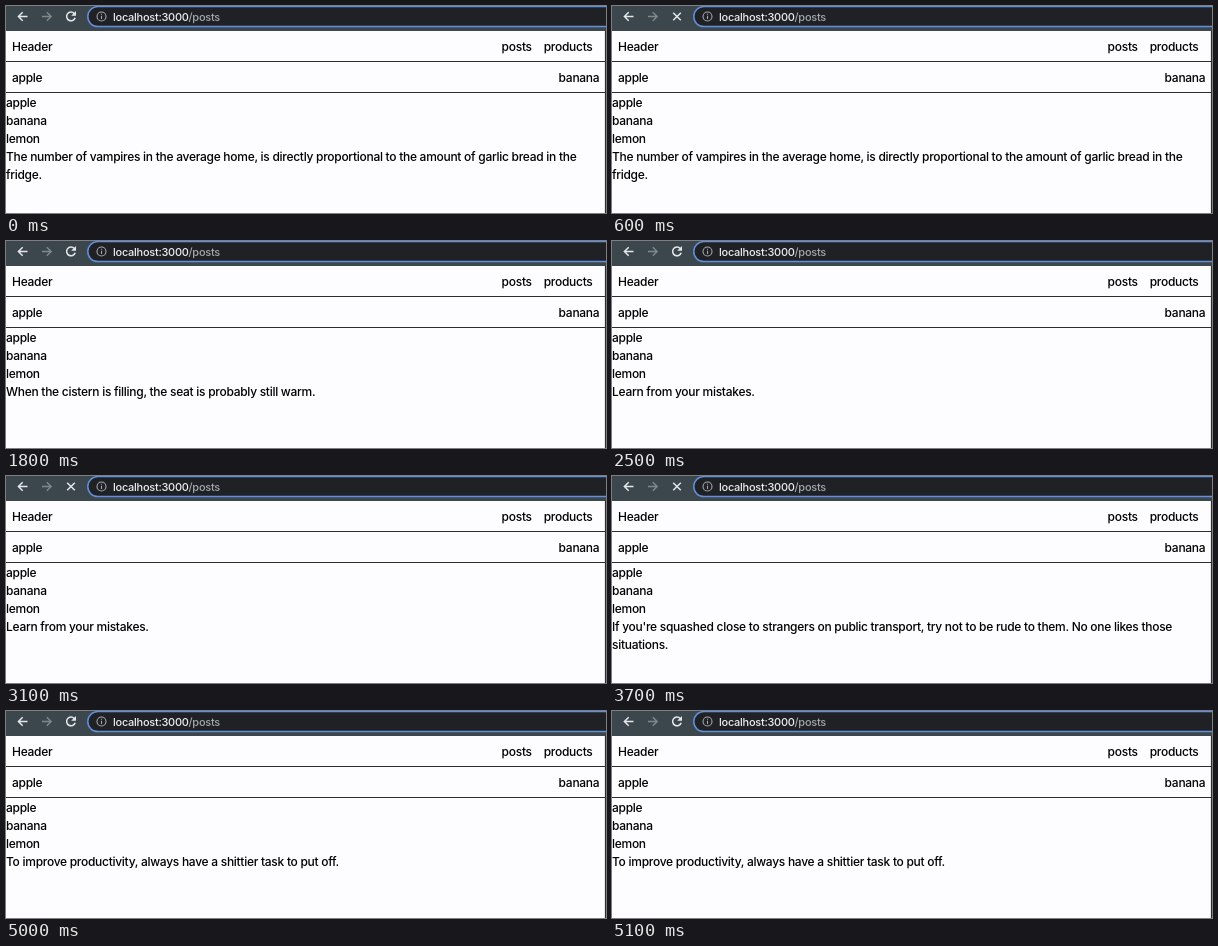
These frames come from a looping animation (600x207 px, 5.6 s). An HTML page:

```html
<!DOCTYPE html>
<html lang="en">
<head>
<meta charset="utf-8">
<style>
  html, body { margin: 0; width: 100%; height: 100%; overflow: hidden; background: #fdfcfe; }
  svg { display: block; }
  text { font: 500 12px Inter, sans-serif; letter-spacing: -.28px; fill: #000; white-space: pre; }
  .url { font-size: 11px; letter-spacing: -.27px; fill: #eceef0; }
  .icon { fill: none; stroke: #e3e7e9; stroke-width: 1.5; }
  .rule { fill: none; stroke: #2c2c2e; stroke-width: 1.2; }
</style>
</head>
<body>
<svg width="600" height="207" viewBox="0 0 600 207">
  <rect width="600" height="207" fill="#fdfcfe"/>
  <rect width="600" height="25" fill="#3c474d"/>
  <rect x="81.8" y=".6" width="540" height="20" rx="10" fill="#1f2124" stroke="#6390dc" stroke-width="1.5"/>

  <path class="icon" d="M21.5 10.5H12.5M16.7 6.2L12.4 10.5L16.7 14.8"/>
  <path class="icon" style="stroke:#7f888d" d="M36 10.5H45M40.8 6.2L45.1 10.5L40.8 14.8"/>
  <g id="reload">
    <path class="icon" d="M68.3 7.4A4.4 4.4 0 1 0 69.2 11.8"/>
    <path fill="#e3e7e9" d="M70 5V9.8H65.2Z"/>
  </g>
  <path id="stop" class="icon" d="M61.2 6.7L68.8 14.3M68.8 6.7L61.2 14.3"/>

  <g class="icon" style="stroke:#a3a8ad;stroke-width:1.1">
    <circle cx="95.5" cy="10.5" r="4.5"/>
    <path d="M95.5 9.8V13M95.5 7.7V8.8"/>
  </g>
  <text class="url" x="107" y="14.6">localhost:3000<tspan fill="#a4a9ae">/posts</tspan></text>

  <path class="rule" d="M0 55.5H600M0 86.5H600M599.5 25V207"/>
  <text x="6" y="45">Header</text>
  <text x="495.6" y="45">posts</text>
  <text x="537.7" y="45">products</text>
  <text x="6" y="76">apple</text>
  <text x="552.6" y="76">banana</text>
  <text x="0" y="101">apple</text>
  <text x="0" y="119">banana</text>
  <text x="0" y="137">lemon</text>
  <text id="line1" x="0" y="155"></text>
  <text id="line2" x="0" y="173"></text>
</svg>
<script>
  const LOOP = 5600;
  // start: advice appears; reload: the next page load begins
  const pages = [
    { start: 0, reload: 600, lines: ["The number of vampires in the average home, is directly proportional to the amount of garlic bread in the", "fridge."] },
    { start: 1000, reload: 1300, lines: ["If you find yourself distressed about something, ask yourself if it will still matter tomorrow or next week or", "next month."] },
    { start: 1800, reload: 2100, lines: ["When the cistern is filling, the seat is probably still warm."] },
    { start: 2500, reload: 2800, lines: ["Learn from your mistakes."] },
    { start: 3200, reload: 3500, lines: ["If you're squashed close to strangers on public transport, try not to be rude to them. No one likes those", "situations."] },
    { start: 3900, reload: 4200, lines: ["Step 1. Give a shit. Step 2. Don't be a dick. Step 3. Know when to let go."] },
    { start: 5000, reload: LOOP, lines: ["To improve productivity, always have a shittier task to put off."] }
  ];
  const el = id => document.getElementById(id);
  const show = (id, on) => el(id).setAttribute("visibility", on ? "visible" : "hidden");

  function draw(now) {
    const t = now % LOOP;
    const page = pages.findLast(p => p.start <= t);
    const loading = t >= page.reload;
    show("stop", loading);
    show("reload", !loading);
    el("line1").textContent = page.lines[0];
    el("line2").textContent = page.lines[1] || "";
  }

  function tick() {
    draw(performance.now());
    requestAnimationFrame(tick);
  }
  tick();
</script>
</body>
</html>
```
